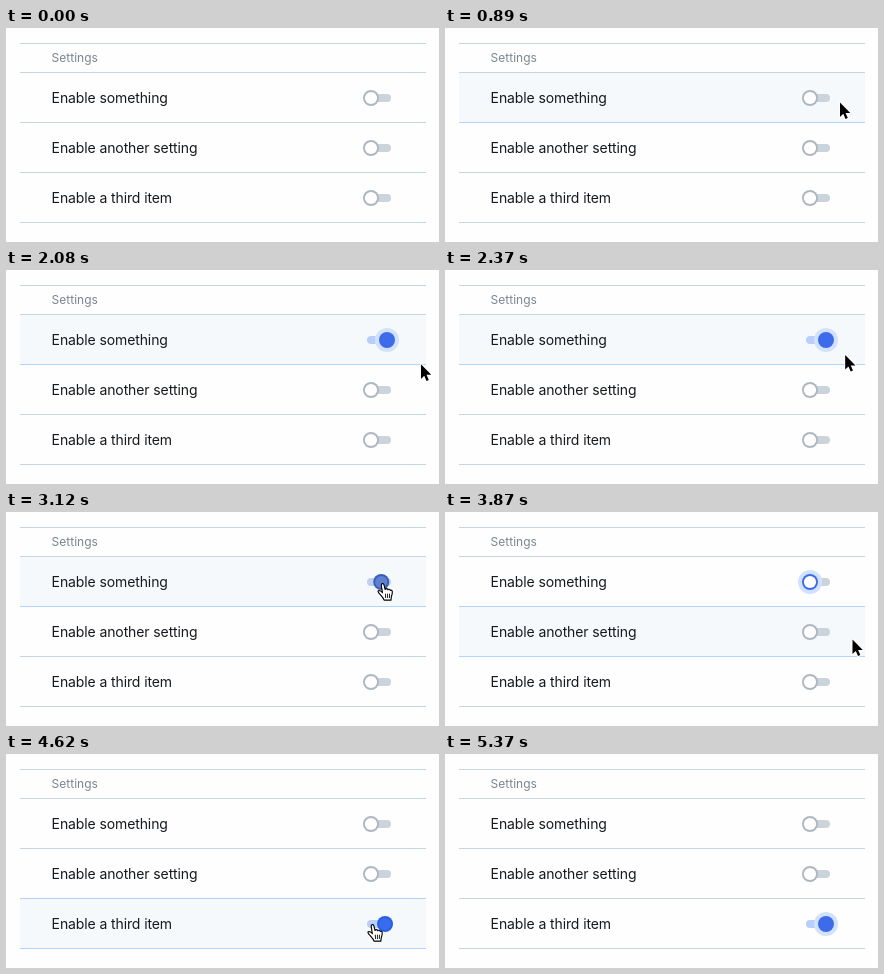
An HTML page with a canvas for the animation above (6.41 s loop, 433 by 214 pixels).

```html
<!DOCTYPE html>
<html lang="en">
<head>
<meta charset="utf-8">
<title>Settings toggles</title>
<style>
html, body { margin: 0; width: 100%; height: 100%; overflow: hidden; background: #fefefe; }
canvas { display: block; width: 433px; height: 214px; }
</style>
</head>
<body>
<canvas id="stage"></canvas>
<script>
const W = 433, H = 214, LOOP = 6410;
const LEFT = 14, RIGHT = 420, FIRST_ROW = 45, ROW_H = 50;
const LABELS = ['Enable something', 'Enable another setting', 'Enable a third item'];
const LINE = '#c5d6e0', HOVER_LINE = '#b2d3fa';
const WHITE = [255, 255, 255], GREY = [174, 183, 192];
const BLUE = [35, 93, 242], FOCUS_BLUE = [61, 107, 233];

const LEAVE = 31, FIRST_CLICK = 4, UNDO_CLICK = 15.6, LAST_CLICK = 24.7;
const ENTRY = [417, 76];
// Each move starts where the previous one ended; times are in steps.
const MOVES = [
  { from: 0, to: 4, x: 366.7, y: 72.5 },
  { from: 7, to: 10, x: 421, y: 97 },
  { from: 10.25, to: 13, x: 376.8, y: 71.5 },
  { from: 17, to: 19, x: 416, y: 126 },
  { from: 20, to: 21, x: 407.5, y: 127.5 },
  { from: 21, to: 25, x: 366.7, y: 170.5 },
  { from: 27, to: 30, x: 421, y: 196 }
];

const ARROW = new Path2D('M0 0V14.6L3.3 11.4L5.5 16.6L7.8 15.6L5.6 10.5H10.3Z');
const HAND = new Path2D('M-1.6 2C-1.9-.2.9-.4 1.3 1.4L2.4 6C3 4.9 5 5 5.3 6.4C6 5.5 7.5 5.8 7.9 7' +
  'C8.8 6.4 9.9 7 10 8.4C10.2 10.5 9.6 12 9 13.5L8.6 17H1.4C.8 15-1 13-2.6 11.3' +
  'C-4 10-5.6 8.6-4.9 7.6C-4 6.6-2 7.6-.4 9.2Z');
const FINGERS = new Path2D('M2.8 10.8L3 14.4M5 10.8V14.4M7.1 10.8L7 14.4');

const canvas = document.getElementById('stage');
const ctx = canvas.getContext('2d');
const scale = window.devicePixelRatio || 1;
canvas.width = W * scale;
canvas.height = H * scale;

const lerp = (a, b, f) => a + (b - a) * f;
const mix = (a, b, f) => a.map((v, i) => lerp(v, b[i], f));
const rgb = c => `rgb(${c.map(Math.round).join()})`;
const rowCentre = i => 70 + i * ROW_H;

function ease(step, from, to) {
  const t = Math.min(1, Math.max(0, (step - from) / (to - from)));
  return 1 - (1 - t) ** 2;
}

// Steps last 150 ms, except for two that are 10 ms shorter.
function stepAt(ms) {
  return Math.floor((ms - 740 + 10 * (ms >= 1480) + 10 * (ms >= 2370)) / 150);
}

function pointerAt(step) {
  return MOVES.reduce((p, m) => mix(p, [m.x, m.y], ease(step, m.from, m.to)), ENTRY);
}

function switchAt(row, step) {
  const flip = click => ease(step, click, click + 2);
  if (row === 0) return flip(FIRST_CLICK) - flip(UNDO_CLICK);
  return row === 2 ? flip(LAST_CLICK) : 0;
}

function line(y, color) {
  ctx.fillStyle = color;
  ctx.fillRect(LEFT, y, RIGHT - LEFT, 1);
}

function text(str, y, size, color, spacing) {
  ctx.font = `${size}px Inter, sans-serif`;
  ctx.letterSpacing = spacing + 'px';
  ctx.fillStyle = color;
  ctx.fillText(str, 45.6, y);
}

function disc(x, y, r, color) {
  ctx.beginPath();
  ctx.arc(x, y, r, 0, 2 * Math.PI);
  ctx.fillStyle = rgb(color);
  ctx.fill();
}

function drawSwitch(y, on, focused, hovered) {
  const x = lerp(365, 381, on);
  const ring = focused && !hovered;
  const active = ring ? FOCUS_BLUE : BLUE;
  const edge = focused ? FOCUS_BLUE : GREY;
  const dim = (4 * on * (1 - on)) ** 2; // darker halfway through a flip
  const tint = (off, middle) => mix(mix(off, active, on), middle, dim);
  ctx.beginPath();
  ctx.roundRect(361, y - 4, 24, 8, 4);
  ctx.fillStyle = rgb(mix([203, 211, 219], [184, 207, 250], on));
  ctx.fill();
  if (ring) disc(x, y, 12, [211, 226, 252]);
  disc(x, y, 8, tint(edge, [60, 92, 174]));
  disc(x, y, 6.1, mix(tint(WHITE, [91, 125, 204]), active, on ** 8));
}

function drawPointer([x, y], hand) {
  const shape = hand ? HAND : ARROW;
  ctx.save();
  ctx.translate(x, y);
  ctx.lineJoin = ctx.lineCap = 'round';
  if (hand) {
    ctx.scale(0.95, 0.98);
    ctx.fillStyle = '#fff';
    ctx.strokeStyle = '#000';
    ctx.lineWidth = 1.2;
    ctx.fill(shape);
    ctx.stroke(shape);
    ctx.lineWidth = 0.9;
    ctx.stroke(FINGERS);
  } else {
    ctx.fillStyle = '#000';
    ctx.strokeStyle = '#fff';
    ctx.lineWidth = 2;
    ctx.stroke(shape);
    ctx.fill(shape);
  }
  ctx.restore();
}

function draw(ms) {
  const step = stepAt(ms);
  const visible = step >= 0 && step < LEAVE;
  const pointer = pointerAt(step);
  const [px, py] = pointer;
  const hover = visible && px < RIGHT ? Math.floor((py - FIRST_ROW) / ROW_H) : -1;
  const hand = hover >= 0 && px > 354 && px < 391 && Math.abs(py - rowCentre(hover)) < 11;
  const focus = step < FIRST_CLICK ? -1 : step < LAST_CLICK ? 0 : 2;

  ctx.setTransform(scale, 0, 0, scale, 0, 0);
  ctx.fillStyle = '#fefefe';
  ctx.fillRect(0, 0, W, H);
  line(15, LINE);
  line(44, LINE);
  text('Settings', 34, 12, '#7b858f', 0);

  LABELS.forEach((label, i) => {
    const top = FIRST_ROW + i * ROW_H;
    if (hover === i) {
      ctx.fillStyle = '#f5f9fc';
      ctx.fillRect(LEFT, top, RIGHT - LEFT, ROW_H - 1);
    }
    line(top + ROW_H - 1, hover === i || hover === i + 1 ? HOVER_LINE : LINE);
    text(label, rowCentre(i) + 5, 14, '#16191d', -0.11);
    drawSwitch(rowCentre(i), switchAt(i, step), focus === i, hand && hover === i);
  });

  if (visible) drawPointer(pointer, hand);
}

const start = performance.now();
function tick() {
  draw((performance.now() - start) % LOOP);
  requestAnimationFrame(tick);
}
tick();
</script>
</body>
</html>
```
